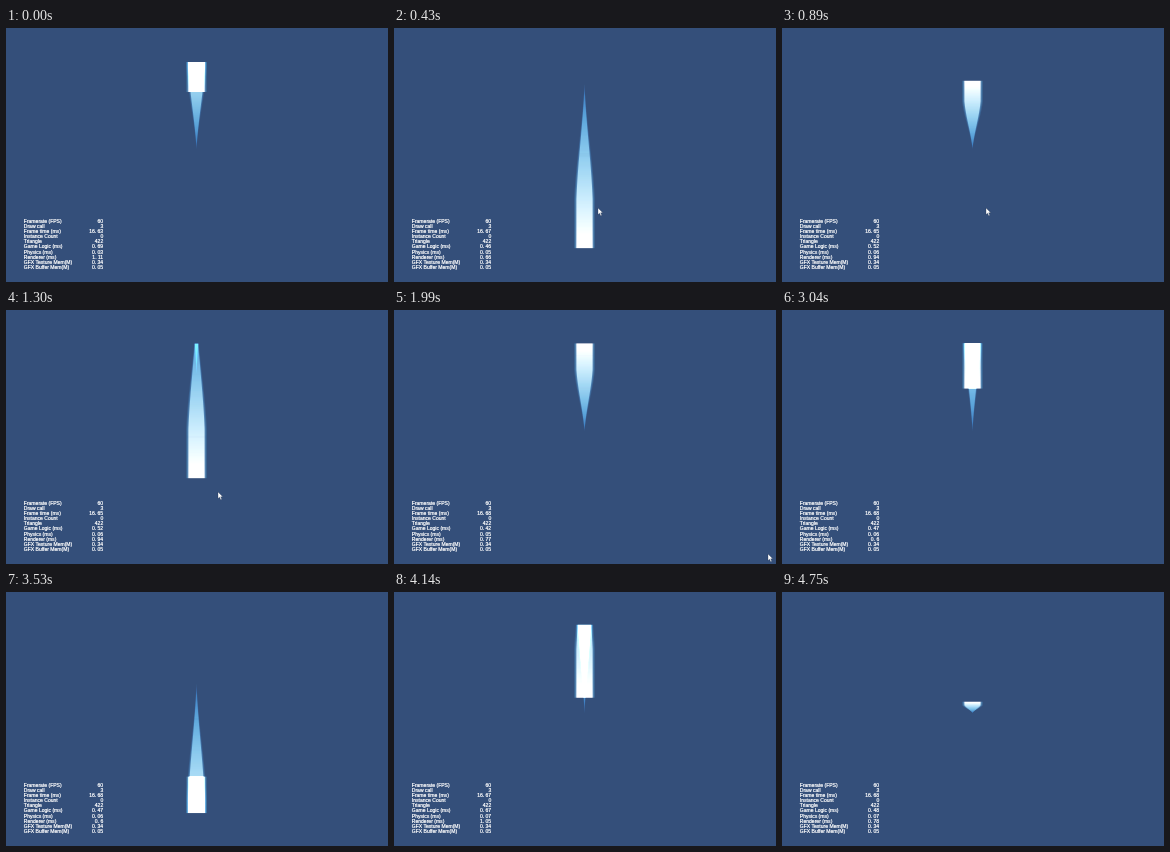
An HTML page with a canvas for the animation above (4820 ms loop, 382 by 254 pixels).

```html
<!DOCTYPE html>
<html lang="en">
<head>
<meta charset="utf-8">
<title>Trail</title>
<style>
  html, body { margin: 0; width: 100%; height: 100%; overflow: hidden; background: #344f7a; }
  canvas, svg { position: absolute; left: 0; top: 0; width: 382px; height: 254px; }
  text { font: 5.05px "Liberation Sans", Arial, sans-serif; fill: #fff; stroke: #fff; stroke-width: .22px; white-space: pre; }
</style>
</head>
<body>
<canvas id="beam" width="382" height="254"></canvas>
<svg viewBox="0 0 382 254">
  <g id="stats"></g>
  <path id="cursor" d="M0 0V6.6L1.6 5.2L2.7 7.8L3.8 7.3L2.7 4.8H4.8Z" fill="#fff" stroke="#1c2c48" stroke-width=".3"/>
</svg>
<script>
const LOOP = 4820, FIRST = 70, STEP = 67.83;
const START = 121, TOP = 34, BOTTOM = 220, MIDDLE = 127, CX = 190.5;
const RISE = START - TOP;
const FALL = RISE + BOTTOM - TOP;
const CYCLE = FALL + BOTTOM - START;
const LENGTH = 163, WIDTH = 18.4;

// [time, distance travelled]: a nearly constant speed with small hitches
const travel = [[0, 117], [430, 273], [1300, 593], [1990, 831], [3040, 1248], [4140, 1647], [4750, 1871]];

// [time, x, y]
const mouse = [[140, 325, 252], [430, 204, 180], [1160, 204, 180], [1300, 212, 182],
  [1600, 374, 236], [1990, 374, 244], [2160, 374, 256]];

const labels = ["Framerate (FPS)", "Draw call", "Frame time (ms)", "Instance Count", "Triangle",
  "Game Logic (ms)", "Physics (ms)", "Renderer (ms)", "GFX Texture Mem(M)", "GFX Buffer Mem(M)"];

// [time, frame time | game logic | physics | renderer]
const readings = [
  [0, "16. 63|0. 69|0. 03|1. 11"],
  [340, "16. 67|0. 46|0. 05|0. 66"],
  [850, "16. 65|0. 52|0. 06|0. 94"],
  [1830, "16. 68|0. 42|0. 05|0. 77"],
  [2400, "16. 68|0. 47|0. 06|0. 6"],
  [3870, "16. 67|0. 67|0. 07|1. 05"],
  [4300, "16. 68|0. 48|0. 07|0. 78"]
];

// Linear interpolation of one column over the time in column 0.
function track(keys, t, col = 1) {
  const i = keys.findIndex(k => k[0] > t);
  if (i === 0) return keys[0][col];
  if (i < 0) return keys[keys.length - 1][col];
  const a = keys[i - 1], b = keys[i];
  return a[col] + (b[col] - a[col]) * (t - a[0]) / (b[0] - a[0]);
}

// The picture holds between evenly spaced marks, which give way to nearby travel keys.
const marks = [0];
for (let t = FIRST; t < LOOP - STEP / 2; t += STEP) {
  const near = travel.find(k => Math.abs(k[0] - t) < STEP / 2);
  marks.push(near && near[0] ? near[0] : t);
}

const latest = (list, fits) => list.reduce((best, item) => fits(item) ? item : best);

const ctx = document.getElementById("beam").getContext("2d");
const cursor = document.getElementById("cursor");
const stats = document.getElementById("stats");

function addText(x, y, anchor, value) {
  const el = document.createElementNS("http://www.w3.org/2000/svg", "text");
  el.setAttribute("x", x);
  el.setAttribute("y", y);
  el.setAttribute("text-anchor", anchor);
  el.textContent = value;
  return stats.appendChild(el);
}

const values = labels.map((label, i) => {
  const y = 194.9 + i * 5.1;
  addText(17.8, y, "start", label);
  return addText(97.2, y, "end", "");
});

function pathY(s) {
  if (s < RISE) return START - s;
  if (s < FALL) return TOP + s - RISE;
  return BOTTOM - (s - FALL);
}

// f runs from the tip (0) to the head (1).
function widthAt(f) {
  const x = Math.min(1, f / .7);
  return WIDTH * (x + x * x * (3 - 2 * x)) / 2;
}

// Blue rises first along the trail, then green, then red.
function drawRow(y, f) {
  const w = widthAt(f);
  const light = [220 * f ** 1.1, 185 * f ** .5, 140 * f ** .25];
  const layer = (scale, ...share) => {
    ctx.fillStyle = `rgb(${light.map((c, i) => Math.round(c * share[i])).join()})`;
    ctx.fillRect(CX - w * scale / 2, y, w * scale, 1);
  };
  layer(1.12, .03, .14, .2);
  layer(1, .17, .2, .25);
  layer(.88, .8, .66, .55);
}

function drawTrail(t) {
  ctx.globalCompositeOperation = "source-over";
  ctx.fillStyle = "#344f7a";
  ctx.fillRect(0, 0, 382, 254);
  ctx.globalCompositeOperation = "lighter";
  ctx.save();
  // The view closes in very slightly over the loop.
  const zoom = 1 + .015 * t / LOOP;
  ctx.translate(0, MIDDLE);
  ctx.scale(1, zoom);
  ctx.translate(0, -MIDDLE);
  const head = Math.round(track(travel, t)) % CYCLE;
  const size = Math.min(head, LENGTH);
  for (let k = .5; k < size; k++) drawRow(Math.floor(pathY(head - k)), 1 - k / size);
  ctx.restore();
}

function render(time) {
  const t = latest(marks, m => m <= time);
  drawTrail(t);

  const [frame, logic, physics, renderer] = latest(readings, r => r[0] <= t)[1].split("|");
  ["60", "3", frame, "0", "422", logic, physics, renderer, "0. 34", "0. 05"]
    .forEach((v, i) => { values[i].textContent = v; });

  const shown = t >= mouse[0][0] && t < mouse[mouse.length - 1][0];
  cursor.setAttribute("visibility", shown ? "visible" : "hidden");
  cursor.setAttribute("transform", `translate(${track(mouse, t)} ${track(mouse, t, 2)})`);
}

const begin = performance.now();
function tick() {
  render((performance.now() - begin) % LOOP);
  requestAnimationFrame(tick);
}
tick();
</script>
</body>
</html>
```
